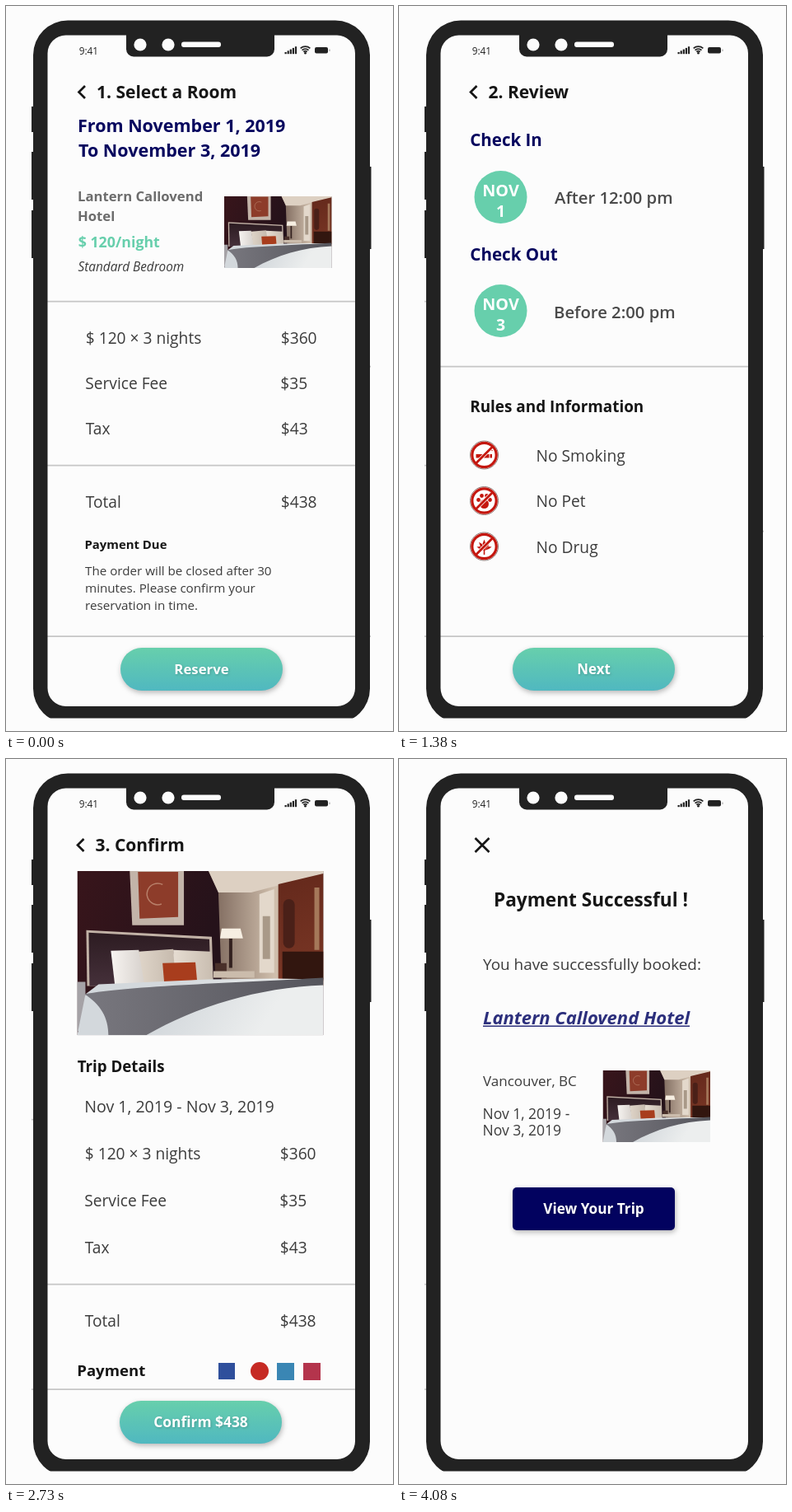
Animation, 470 px wide and 880 px high, one loop 5400 ms. Source, as an HTML page with a canvas:

```html
<!DOCTYPE html>
<html lang="en">
<head>
<meta charset="utf-8">
<title>Hotel booking flow</title>
<style>
  html, body { margin: 0; width: 100%; height: 100%; overflow: hidden; background: #fcfcfc; }
  canvas { display: block; }
</style>
</head>
<body>
<canvas id="stage" width="470" height="880"></canvas>
<script>
const W = 470, H = 880, PAGE = 374, LEFT = 50;
const LOOP = 5400, STEP = 30, STEPS = 17, STARTS = [900, 2250, 3600];
const BLUR = 5, SHUTTER_OPEN = 0.7, SHUTTER_CLOSE = 1.16;
const BG = '#fcfcfc', INK = '#161616', BODY = '#3c3c3c', NAVY = '#06065e', GREEN = '#67cfac', BEZEL = '#222';
const FONT = '"Open Sans", "Noto Sans", sans-serif';

const ctx = document.getElementById('stage').getContext('2d');
const strip = document.createElement('canvas');
strip.width = PAGE * 4;
strip.height = H;
const g = strip.getContext('2d');

// Drawing helpers

function text(c, str, x, y, size, color = BODY, style = '400', align = 'left') {
  c.font = `${style} ${size}px ${FONT}`;
  c.fillStyle = color;
  c.textAlign = align;
  c.fillText(str, x, y);
}

function bold(str, x, y, size, color = INK) {
  text(g, str, x, y, size, color, '700');
}

function poly(c, color, ...pts) {
  c.fillStyle = color;
  c.beginPath();
  for (let i = 0; i < pts.length; i += 2) c.lineTo(pts[i], pts[i + 1]);
  c.fill();
}

function stroke(c, color, width, ...pts) {
  c.strokeStyle = color;
  c.lineWidth = width;
  c.beginPath();
  for (let i = 0; i < pts.length; i += 2) c.lineTo(pts[i], pts[i + 1]);
  c.stroke();
}

function box(c, color, x, y, w, h, r = 0) {
  c.fillStyle = color;
  c.beginPath();
  c.roundRect(x, y, w, h, r);
  c.fill();
}

function disc(c, color, x, y, r) {
  c.fillStyle = color;
  c.beginPath();
  c.arc(x, y, r, 0, Math.PI * 2);
  c.fill();
}

function ring(c, color, width, x, y, r, from = 0, to = Math.PI * 2) {
  c.strokeStyle = color;
  c.lineWidth = width;
  c.beginPath();
  c.arc(x, y, r, from, to);
  c.stroke();
}

function shade(c, x0, y0, x1, y1, from, to) {
  const fill = c.createLinearGradient(x0, y0, x1, y1);
  fill.addColorStop(0, from);
  fill.addColorStop(1, to);
  return fill;
}

function shadow(c, blur, dx, dy, alpha) {
  c.shadowColor = `rgba(0,0,0,${alpha})`;
  c.shadowBlur = blur;
  c.shadowOffsetX = dx;
  c.shadowOffsetY = dy;
}

// Page parts

function divider(y) {
  box(g, '#c6c6c6', LEFT, y - 0.8, PAGE, 1.7);
}

function header(str, x) {
  stroke(g, INK, 2.7, x + 9, 97, x + 1.5, 104.5, x + 9, 112);
  bold(str, x + 23, 112, 21);
}

function button(label, x, y, size, fill, r) {
  g.save();
  shadow(g, 6, 1, 2.5, 0.28);
  box(g, fill, x, y, 197, 52, r);
  shadow(g, 3, 1, 1, 0.2);
  text(g, label, x + 98.5, y + 32, size, '#fff', '700', 'center');
  g.restore();
}

function footer(label, x, size) {
  divider(765);
  button(label, x, 779, size, shade(g, 0, 779, 0, 831, '#67cfac', '#50b8c0'), 26);
}

function row(label, price, y, x) {
  text(g, label, x, y, 19.2);
  text(g, price, x + 237, y, 19.2);
}

function photo(x, y, w) {
  g.save();
  g.beginPath();
  g.rect(x, y, w, w * 2 / 3);
  g.clip();
  g.translate(x, y);
  g.scale(w / 300, w / 300);
  box(g, shade(g, 0, 0, 170, 60, '#38151b', '#25121a'), 0, 0, 300, 200);
  // wall, ceiling and doorway
  poly(g, shade(g, 165, 0, 240, 0, '#7d685c', '#cfbeac'), 160, 0, 300, 0, 300, 140, 176, 140, 172, 26);
  poly(g, '#ddd0c2', 160, 0, 300, 0, 300, 3, 212, 26, 172, 26);
  poly(g, shade(g, 245, 0, 300, 140, '#63281b', '#7c3826'), 245, 16, 300, 3, 300, 140, 245, 140);
  box(g, '#4a2018', 251, 34, 14, 60, 7);
  box(g, '#a5785a', 289, 20, 6, 76);
  box(g, '#32160f', 250, 98, 50, 36);
  poly(g, '#e3d8cb', 222, 28, 240, 22, 240, 124, 222, 124);
  box(g, '#a99988', 226, 55, 9, 52);
  // picture
  poly(g, '#c3b4a9', 64, 0, 130, 0, 130, 66, 67, 66);
  poly(g, '#8d3c2a', 74, 1, 123, 1, 123, 56, 76, 58);
  ring(g, '#b87f69', 1.5, 98, 28, 13, 1.2, 5.2);
  // headboard, table and lamp
  poly(g, '#c2b2a6', 11, 72, 164, 80, 166, 140, 12, 140);
  poly(g, shade(g, 0, 76, 0, 140, '#2d1c22', '#45303a'), 14, 75, 161, 83, 163, 140, 15, 140);
  box(g, '#49302a', 168, 112, 14, 18);
  box(g, '#33211f', 185, 82, 4, 36);
  poly(g, '#f6eee2', 176, 70, 199, 70, 202, 82, 174, 82);
  box(g, '#cbbcac', 166, 122, 50, 8);
  box(g, '#a5a2a6', 0, 135, 10, 60);
  // pillows
  poly(g, shade(g, 41, 0, 84, 0, '#f7f4f1', '#d5cfca'), 41, 97, 75, 96, 84, 138, 46, 140);
  poly(g, shade(g, 75, 0, 122, 0, '#dfd5c9', '#c4b8ab'), 75, 98, 117, 95, 122, 134, 82, 138);
  poly(g, shade(g, 117, 0, 165, 0, '#e6ddd2', '#c9bdb0'), 117, 96, 163, 98, 165, 134, 120, 136);
  poly(g, '#a83d1d', 104, 112, 144, 111, 146, 133, 106, 136);
  // bedding
  poly(g, shade(g, 120, 140, 220, 200, '#d3d8dc', '#eceeee'), 10, 150, 26, 138, 160, 132, 240, 131, 300, 132, 300, 200, 0, 200);
  g.fillStyle = shade(g, 20, 0, 300, 0, '#77767d', '#55555c');
  g.beginPath();
  g.moveTo(9, 150);
  g.bezierCurveTo(60, 140, 200, 136, 300, 130);
  g.lineTo(300, 139);
  g.bezierCurveTo(220, 142, 145, 165, 84, 200);
  g.lineTo(38, 200);
  g.bezierCurveTo(38, 178, 28, 162, 9, 150);
  g.fill();
  g.restore();
}

function dateBadge(day, y) {
  disc(g, GREEN, 123.5, y, 32);
  text(g, 'NOV', 123.5, y - 1, 19.8, '#fff', '700', 'center');
  text(g, day, 123.5, y + 24, 19.5, '#fff', '700', 'center');
}

const RED = '#c4170f', ICON_X = 103.5;
const symbols = [
  y => {
    box(g, RED, ICON_X - 10, y - 1, 16, 4.5);
    box(g, RED, ICON_X + 7, y - 1, 2.5, 4.5);
    ring(g, RED, 1.2, ICON_X + 7, y - 4, 3, 3.4, 6);
  },
  y => {
    disc(g, RED, ICON_X, y + 4, 5.5);
    for (const [dx, dy] of [[-7, -1], [-3, -6], [3, -6], [7, -1]]) disc(g, RED, ICON_X + dx, y + dy, 2.4);
  },
  y => {
    const tip = (a, r) => [ICON_X + Math.sin(a) * r, y + 3 - Math.cos(a) * r];
    for (let i = -2; i <= 2; i++) {
      const a = i * 0.65, r = 11.5 - Math.abs(i);
      poly(g, RED, ICON_X, y + 5, ...tip(a - 0.27, r * 0.6), ...tip(a, r), ...tip(a + 0.27, r * 0.6));
    }
    stroke(g, RED, 1.6, ICON_X, y + 3, ICON_X, y + 10);
  }
];

function rule(label, y, symbol) {
  disc(g, '#fff', ICON_X, y, 17);
  ring(g, '#8d7774', 1, ICON_X, y, 17);
  symbol(y);
  ring(g, RED, 3.2, ICON_X, y, 14.7);
  stroke(g, '#fff', 4.5, ICON_X - 9, y + 9, ICON_X + 9, y - 9);
  stroke(g, RED, 2.8, ICON_X - 10, y + 10, ICON_X + 10, y - 10);
  text(g, label, 166.5, y + 7.5, 19.2);
}

// Pages

function roomPage() {
  header('1. Select a Room', 87);
  bold('From November 1, 2019', 87, 152.5, 21.5, NAVY);
  bold('To November 3, 2019', 88, 182.5, 21.5, NAVY);
  bold('Lantern Callovend', 87, 237, 16.7, '#6c6c6c');
  bold('Hotel', 87, 261, 16.7, '#6c6c6c');
  bold('$ 120/night', 87.7, 293, 17.8, GREEN);
  text(g, 'Standard Bedroom', 87.5, 322, 15.4, BODY, 'italic 400');
  photo(265, 231, 130.5);
  divider(358.5);
  row('$ 120 × 3 nights', '$360', 410, 96.7);
  row('Service Fee', '$35', 465, 96.2);
  row('Tax', '$43', 520, 96.7);
  divider(557.5);
  row('Total', '$438', 609, 96.7);
  bold('Payment Due', 95.5, 659, 14.9);
  ['The order will be closed after 30', 'minutes. Please confirm your', 'reservation in time.']
    .forEach((line, i) => text(g, line, 96, 691 + i * 21, 15.2));
  footer('Reserve', 139, 16.8);
}

function reviewPage() {
  header('2. Review', 85.5);
  bold('Check In', 86.3, 170, 20.5, NAVY);
  dateBadge('1', 232);
  text(g, 'After 12:00 pm', 189, 239.5, 20.3, '#4a4a4a', '600');
  bold('Check Out', 86.3, 309, 20.6, NAVY);
  dateBadge('3', 370);
  text(g, 'Before 2:00 pm', 188, 378.5, 20.3, '#4a4a4a', '600');
  divider(437.5);
  bold('Rules and Information', 86.2, 493, 18.9);
  ['No Smoking', 'No Pet', 'No Drug'].forEach((s, i) => rule(s, 545 + i * 55.5, symbols[i]));
  footer('Next', 138, 16.9);
}

function confirmPage() {
  header('3. Confirm', 85.5);
  photo(86.5, 136, 299);
  bold('Trip Details', 86.7, 380, 18.7);
  text(g, 'Nov 1, 2019 - Nov 3, 2019', 95.2, 429, 19.6);
  row('$ 120 × 3 nights', '$360', 486, 95.7);
  row('Service Fee', '$35', 543, 95.2);
  row('Tax', '$43', 600, 95.7);
  divider(637.5);
  row('Total', '$438', 689, 95.7);
  bold('Payment', 86.2, 749, 18.6);
  box(g, '#2f4f9c', 258, 733, 20, 20);
  disc(g, '#c62a24', 308, 743, 11);
  box(g, '#3a86b4', 329, 733, 21, 21);
  box(g, '#b4344c', 361, 733, 21, 21);
  footer('Confirm $438', 138, 17.4);
}

function donePage() {
  stroke(g, INK, 2.6, 92.5, 96, 109.5, 113);
  stroke(g, INK, 2.6, 109.5, 96, 92.5, 113);
  bold('Payment Successful !', 115, 179, 22.6);
  text(g, 'You have successfully booked:', 102, 256, 18.9);
  const name = 'Lantern Callovend Hotel', color = '#2c2f7c';
  text(g, name, 102, 322, 22, color, 'italic 700');
  box(g, color, 102, 323.5, g.measureText(name).width, 1.6);
  text(g, 'Vancouver, BC', 102, 397, 17);
  text(g, 'Nov 1, 2019 -', 101.5, 437, 17.5);
  text(g, 'Nov 3, 2019', 101.5, 457, 17.5);
  photo(247.5, 378, 130.5);
  button('View Your Trip', 138, 520, 17.2, '#02025f', 5);
}

function buildStrip() {
  g.fillStyle = BG;
  g.fillRect(0, 0, strip.width, H);
  [roomPage, reviewPage, confirmPage, donePage].forEach((page, i) => {
    g.save();
    g.translate(i * PAGE - LEFT, 0);
    page();
    g.restore();
  });
}

// Phone

function drawPhone() {
  const c = ctx;
  c.save();
  c.beginPath();
  c.rect(0, 0, W, 864.5);
  c.clip();
  c.fillStyle = BEZEL;
  c.beginPath();
  c.roundRect(33, 17.5, 409, 853, 42);
  c.roundRect(50.5, 35.5, 373.5, 814.5, 22);
  c.fill('evenodd');
  c.restore();
  for (const [x, y, h] of [[31, 122, 31], [31, 177, 58], [31, 248, 58], [441, 195, 100]]) box(c, BEZEL, x, y, 2.5, h);

  box(c, BEZEL, 146, 34, 180, 27.5, [0, 0, 9, 9]);
  disc(c, BG, 163, 47, 7.6);
  disc(c, BG, 197, 47, 7.6);
  box(c, BG, 213, 43.5, 48, 6.5, 3);

  text(c, '9:41', 88.7, 59, 11.8, '#222');
  for (let i = 0; i < 5; i++) box(c, BEZEL, 338.5 + i * 3.1, 56 - i * 1.7, 2.2, 2.2 + i * 1.7);
  for (const r of [3.2, 6, 8.8]) ring(c, BEZEL, 1.7, 363.5, 58, r, -2.3, -0.84);
  disc(c, BEZEL, 363.5, 57.2, 1.4);
  box(c, BEZEL, 375, 50, 16, 7.5, 2);
  box(c, '#999', 392.5, 52.5, 1, 2.5);
}

// Motion

// Cubic ease-in-out, the curve 0.42, 0, 0.58, 1
function ease(x) {
  if (x >= 1) return 1;
  let lo = 0, hi = 1;
  for (let i = 0; i < 24; i++) {
    const s = (lo + hi) / 2;
    const at = 1.26 * s * (1 - s) * (1 - s) + 1.74 * s * s * (1 - s) + s * s * s;
    if (at < x) lo = s; else hi = s;
  }
  return lo * lo * (3 - 2 * lo);
}

// Page positions seen while the shutter is open at time t
function exposures(t) {
  const i = STARTS.filter(s => t >= s).length - 1;
  if (i < 0) return [0];
  const n = Math.floor((t - STARTS[i]) / STEP);
  if (n >= STEPS - 1) return [i + 1];
  // The first slide rests for one step before it moves
  if (i === 0 && n === 0) return [0];
  const gap = (SHUTTER_CLOSE - SHUTTER_OPEN) / (BLUR - 1);
  return Array.from({ length: BLUR }, (_, k) => i + ease((n + SHUTTER_OPEN + k * gap) / STEPS));
}

function draw(t) {
  ctx.fillStyle = BG;
  ctx.fillRect(0, 0, W, H);
  ctx.save();
  ctx.beginPath();
  ctx.rect(31, 36, 412, 814);
  ctx.clip();
  exposures(t).forEach((pos, k) => {
    ctx.globalAlpha = 1 / (k + 1);
    ctx.drawImage(strip, LEFT - pos * PAGE, 0);
  });
  ctx.restore();
  drawPhone();
}

function tick() {
  draw(performance.now() % LOOP);
  requestAnimationFrame(tick);
}

buildStrip();
tick();
</script>
</body>
</html>
```
